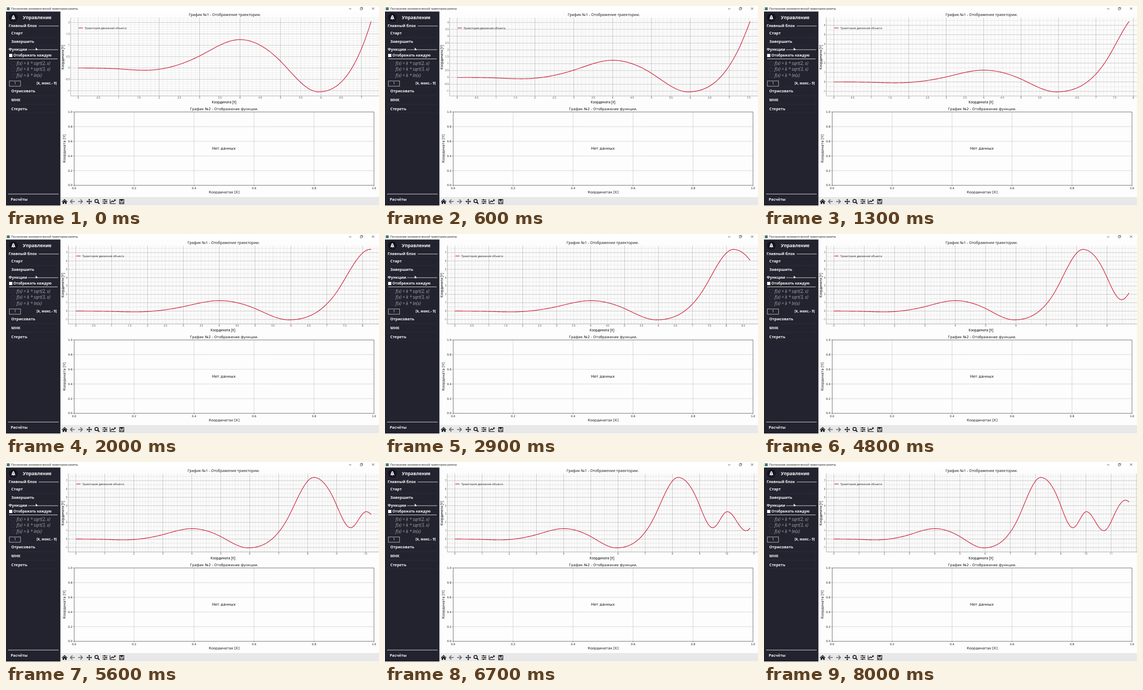
These frames come from a looping animation (708x380 px, 8.1 s). An HTML page with a canvas:

```html
<!DOCTYPE html>
<html lang="ru">
<head>
<meta charset="utf-8">
<title>Построение кинематической траектории ракеты</title>
<style>
html, body { margin: 0; width: 100%; height: 100%; overflow: hidden; background: #fdfdfd; }
canvas { display: block; width: 708px; height: 380px; }
</style>
</head>
<body>
<canvas id="stage"></canvas>
<script>
const W = 708, H = 380, LOOP = 8100, STEP = 100;
const SANS = '"Noto Sans", "Open Sans", sans-serif';
const DEJA = '"DejaVu Sans", sans-serif';
const INK = '#111', WHITE = '#f6f6f8', PANEL = '#22232e', BAR = '#e8e8e8', RED = '#cd2038';
const canvas = document.getElementById('stage');
const ctx = canvas.getContext('2d');
const dpr = window.devicePixelRatio || 1;
canvas.width = W * dpr;
canvas.height = H * dpr;

// Trajectory: turning points (even places) with one point on each slope between them.
const KEYS = [
  [0, 0], [0.95, -0.035], [1.65, -0.1], [3, 0.53], [4, 1.25], [5.05, 0.21], [5.94, -1.05],
  [7.24, 2.05], [8.21, 7.38], [8.9, 4.8], [9.48, 1.36], [9.75, 2.3], [10.02, 3.28],
  [10.36, 2.15], [10.71, 1], [11.1, 2.75], [11.57, 4.66], [11.95, 3.3], [12.3, 2]
];
const LOW = -1.05;

// Flat at turning points, sine-like steepness on the slopes.
function steepness(i) {
  if (i % 2 === 0) return 0;
  const [a, b] = [KEYS[i - 1], KEYS[i + 1]];
  return Math.PI / 2 * (b[1] - a[1]) / (b[0] - a[0]);
}

function height(x) {
  let i = 0;
  while (x > KEYS[i + 1][0]) i++;
  const [x0, y0] = KEYS[i], [x1, y1] = KEYS[i + 1];
  const h = x1 - x0, u = (x - x0) / h, v = 1 - u;
  return y0 + (y1 - y0) * u * u * (3 - 2 * u)
    + h * u * v * (v * steepness(i) - u * steepness(i + 1));
}

// Horizontal position of the rocket after s seconds.
const reach = s => 7.24 + 0.495 * s + 0.001 * s ** 3;

function text(s, x, y, size, o = {}) {
  ctx.save();
  ctx.translate(x, y);
  if (o.turn) ctx.rotate(-Math.PI / 2);
  ctx.font = `${o.style || ''} ${size}px ${o.font || SANS}`;
  ctx.textAlign = o.align || 'left';
  ctx.textBaseline = 'middle';
  ctx.fillStyle = o.color || '#1c1c1c';
  ctx.fillText(s, 0, 0.3);
  ctx.restore();
}

function trace(p) {
  ctx.beginPath();
  for (let i = 0; i < p.length; i += 2) ctx.lineTo(p[i], p[i + 1]);
}

function line(color, width, ...p) {
  ctx.strokeStyle = color;
  ctx.lineWidth = width;
  trace(p);
  ctx.stroke();
}

function shape(color, ...p) {
  ctx.fillStyle = color;
  trace(p);
  ctx.fill();
}

function rect(color, x, y, w, h) {
  ctx.fillStyle = color;
  ctx.fillRect(x, y, w, h);
}

function frame(color, width, x, y, w, h) {
  ctx.strokeStyle = color;
  ctx.lineWidth = width;
  ctx.strokeRect(x, y, w, h);
}

function circle(x, y, r) {
  ctx.beginPath();
  ctx.arc(x, y, r, 0, 7);
}

function ring(color, width, x, y, r) {
  ctx.strokeStyle = color;
  ctx.lineWidth = width;
  circle(x, y, r);
  ctx.stroke();
}

function at(x, y, paint) {
  ctx.save();
  ctx.translate(x, y);
  paint();
  ctx.restore();
}

function titleBar() {
  rect('#fff', 0, 0, W, 10.5);
  rect('#4a7768', 1.5, 2.5, 5.5, 5.5);
  text('Построение кинематической траектории ракеты', 10, 5.3, 5.25);
  line('#333', 0.7, 651, 5.5, 655.5, 5.5);
  frame('#333', 0.6, 672.5, 3.8, 3.4, 3.4);
  line('#333', 0.6, 673.7, 3.8, 673.7, 2.6, 677.1, 2.6, 677.1, 6, 675.9, 6);
  line('#333', 0.7, 694.5, 2.7, 699, 7.2);
  line('#333', 0.7, 699, 2.7, 694.5, 7.2);
}

function rocket() {
  ctx.fillStyle = '#11121b';
  circle(0, 0, 8);
  ctx.fill();
  ctx.fillStyle = WHITE;
  ctx.beginPath();
  ctx.moveTo(0, -5);
  ctx.quadraticCurveTo(4, -1, 2, 2.5);
  ctx.lineTo(-2, 2.5);
  ctx.quadraticCurveTo(-4, -1, 0, -5);
  ctx.fill();
  for (const d of [-1, 1]) shape(WHITE, 2.4 * d, 0, 4 * d, 3.5, 1.6 * d, 2.5);
  shape(WHITE, -1, 3.2, 1, 3.2, 0, 5);
  rect('#11121b', -0.8, -1.6, 1.6, 1.6);
}

function sidebar() {
  const bold = (s, x, y, size = 7.3) => text(s, x, y, size, { style: 'bold', color: WHITE });
  const rule = (x, y, end) => line(WHITE, 0.8, x, y, end, y);
  const buttons = (names, top) => names.forEach((name, i) => {
    const y = top + 16.6 * i;
    frame('#2b2c38', 0.7, 6, y - 7.5, 92, 15);
    bold(name, 10, y);
  });

  rect(PANEL, 0, 10.5, 103.3, 368.5);
  at(14, 22, rocket);
  bold('Управление', 32, 22.7, 8.5);
  bold('Главный блок', 5, 38);
  rule(62, 38, 100);
  buttons(['Старт', 'Завершить'], 51.5);

  bold('Функции', 5, 83);
  rule(42, 83, 99);
  rect('#fff', 6, 91, 6, 6);
  bold('Отображать каждую', 14, 94, 6.65);
  rule(6, 100.5, 98);
  ['sqrt(2, x)', 'sqrt(3, x)', 'ln(x)'].forEach((f, i) => {
    const y = 109 + i * 11.5;
    ring('#393a45', 0.8, 13.5, y, 3.8);
    text('f(x) = k * ' + f, 20, y + 0.3, 8.1, { style: 'italic', color: '#a0a1a9' });
  });
  frame('#c9c9ce', 0.8, 6.3, 142.3, 21.4, 10);
  text('1', 17, 147.3, 6.3, { align: 'center', color: WHITE });
  bold('[k, макс.- 9]', 58, 147.3, 6.6);
  buttons(['Отрисовать', 'МНК', 'Стереть'], 162);

  rule(4, 357.3, 100);
  bold('Расчёты', 9, 367.5);
  shape('#fff', 56.5, 79, 56.5, 84.6, 58.2, 83.2, 59.3, 85.3, 58.8, 83.1, 60.5, 83);
}

function lowerPlot() {
  const x0 = 129.3, y0 = 201.2, w = 569.2, h = 139.6;
  const o = { font: DEJA, color: INK, align: 'center' };
  for (let i = 0; i <= 5; i++) {
    const x = x0 + w * i / 5, y = y0 + h - h * i / 5, s = (i / 5).toFixed(1);
    line('#c8c8c8', 0.7, x, y0, x, y0 + h);
    line('#c8c8c8', 0.7, x0, y, x0 + w, y);
    line('#333', 0.5, x, y0 + h, x, y0 + h + 1.8);
    line('#333', 0.5, x0 - 1.8, y, x0, y);
    text(s, x, 346.2, 5.2, o);
    text(s, 126, y, 5.2, { ...o, align: 'right' });
  }
  frame('#444', 0.6, x0, y0, w, h);
  text('График №2 - Отображение функции.', 414, 195.5, 6.63, o);
  text('Координатах [X]', 414, 354, 6.63, o);
  text('Координата [Y]', 111.2, 271, 6.63, { ...o, turn: true });
  text('Нет данных', 413.5, 270.5, 7.2, o);
}

function arrow(d) {
  line('#666', 1.6, -4.2 * d, 0, 3.6 * d, 0);
  line('#666', 1.6, 0.2 * d, -4, 4 * d, 0, 0.2 * d, 4);
}

// Toolbar icons around their own centre; null is a separator.
const ICONS = [
  function home() {
    line(INK, 1.2, -5, 0.8, 0, -4, 5, 0.8);
    shape(INK, -3.7, 1.2, 0, -2.2, 3.7, 1.2, 3.7, 4.5, -3.7, 4.5);
    rect(BAR, -1, 1.8, 2, 2.7);
  },
  () => arrow(-1),
  () => arrow(1),
  null,
  function pan() {
    for (let i = 0; i < 4; i++) {
      line(INK, 1.2, 0, 0, 4, 0);
      shape(INK, 5.2, 0, 3, -2, 3, 2);
      ctx.rotate(Math.PI / 2);
    }
  },
  function zoom() {
    ring(INK, 1.5, -1, -1, 3.1);
    line(INK, 1.9, 1.2, 1.3, 4.4, 4.4);
  },
  function sliders() {
    for (let i = -1; i <= 1; i++) {
      line(INK, 1, -4.7, 3.2 * i, 4.7, 3.2 * i);
      rect(INK, 1.2 - 3 * Math.abs(i), 3.2 * i - 1.3, 1.8, 2.6);
    }
  },
  function axes() {
    line(INK, 1, -5.2, -4.2, -5.2, 4, 5.4, 4);
    line(INK, 1.4, -4, 2, -1, -1.3, 1, 0.6, 4.5, -3);
    shape(INK, 2, -4, 5.5, -4, 5.5, -0.5);
  },
  null,
  function save() {
    frame(INK, 1.1, -4.1, -4, 8.2, 8.2);
    rect(INK, -2.6, -4, 4.8, 2.8);
    frame(INK, 0.9, -2.3, 1, 4.6, 3);
  }
];

function toolbar() {
  rect(BAR, 103.3, 363, W - 103.3, 16);
  let x = 111.3;
  for (const icon of ICONS) {
    if (icon) at(x, 371.5, icon);
    x += icon ? 14.9 : 2;
  }
}

// Ticks of one step inside [lo, hi], without those of a coarser step.
function ticks(lo, hi, step, coarse) {
  const list = [];
  for (let i = Math.ceil(lo / step); i * step <= hi; i++) {
    const v = +(i * step).toFixed(2), r = coarse ? v / coarse : 0.5;
    if (Math.abs(r - Math.round(r)) > 1e-6) list.push(v);
  }
  return list;
}

// Grid lines fade with finer steps and closer packing.
function grid(lo, hi, steps, span, put) {
  steps.forEach((step, i) => {
    const list = ticks(lo, hi, step, steps[i - 1]);
    const alpha = 0.7 * Math.min(1, 0.136 * span / (list.length + 1)) / (i + 1) ** 1.3;
    list.forEach(v => put(v, `rgba(110,110,110,${alpha})`));
  });
}

function upperPlot(s) {
  const tip = reach(s), top = 22, bottom = 171;
  const curve = [];
  for (let x = 0; x < tip; x += 0.02) curve.push([x, height(x)]);
  curve.push([tip, height(tip)]);
  const max = Math.max(...curve.map(p => p[1]));

  // The axis is wider while half steps are labelled.
  const fine = max - LOW < 5.4;
  const left = fine ? 122.7 : 118.3, pad = 14.3, mid = (left + W) / 2;
  const sx = (W - 15 - left - pad) / tip, sy = 133.8 / (max - LOW);
  const px = x => left + pad + x * sx, py = y => 163.1 - (y - LOW) * sy;
  const xLo = -pad / sx, xHi = (W - left - pad) / sx;
  const yLo = LOW - 7.9 / sy, yHi = max + 7.3 / sy;

  grid(xLo, xHi, [1, 0.5, 0.1], W - left, (v, c) => line(c, 0.5, px(v), top, px(v), bottom + 1));
  grid(yLo, yHi, fine ? [0.5, 0.1] : [1, 0.5, 0.1], bottom - top, (v, c) => line(c, 0.5, left - 1, py(v), W, py(v)));
  line('#8a8a8a', 0.6, left, top, left, bottom, W, bottom);

  const small = { color: '#444', align: 'center' };
  for (const v of ticks(0, xHi, tip < 9.5 ? 0.5 : 1)) {
    if (px(v) < 704) text(String(v), px(v), 174.5, 4.7, small);
  }
  for (const v of ticks(yLo, yHi, fine ? 0.5 : 1)) {
    if (py(v) > top + 2) text(String(v), left - 1.8, py(v), 4.7, { ...small, align: 'right' });
  }

  ctx.lineJoin = 'round';
  line(RED, 1.15, ...curve.flatMap(([x, y]) => [px(x), py(y)]));
  ctx.lineJoin = 'miter';

  const dark = { color: '#000', align: 'center' };
  line(RED, 1.15, left + 15.2, 41.8, left + 23.2, 41.8);
  text('Траектория движения объекта', left + 26.5, 42.2, 5.25, { color: '#333' });
  text('График №1 - Отображение траектории.', mid, 16.8, 7.1, { align: 'center' });
  text('Координата [X]', mid - 1.5, 183.3, 6.3, dark);
  text('Координата [Y]', 107.5, 97.5, 6.3, { ...dark, turn: true });
}

function draw(now) {
  const t = Math.floor(now % LOOP / STEP) * STEP;
  ctx.setTransform(dpr, 0, 0, dpr, 0, 0);
  rect('#fdfdfd', 0, 0, W, H);
  titleBar();
  upperPlot(t / 1000);
  lowerPlot();
  toolbar();
  sidebar();
}

const start = performance.now();
function tick() {
  draw(performance.now() - start);
  requestAnimationFrame(tick);
}
tick();
</script>
</body>
</html>
```
